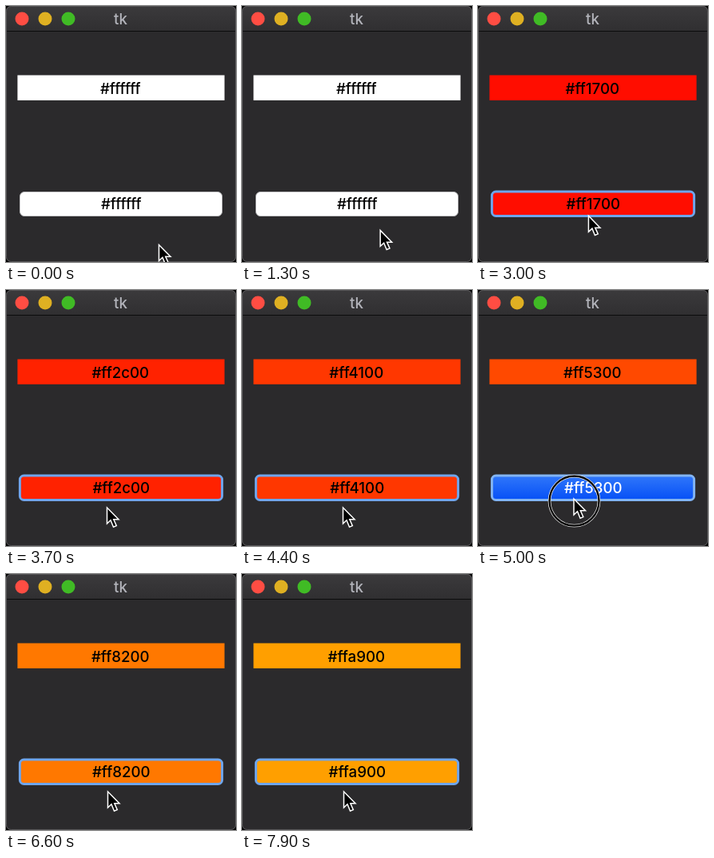
An HTML page that plays this animation: 288x320 px, repeating every 8 s.

```html
<!DOCTYPE html>
<html lang="en">
<head>
<meta charset="utf-8">
<title>tk</title>
<style>
  html, body { margin: 0; width: 100%; height: 100%; overflow: hidden; background: #000; }
  svg { display: block; }
  text { font: 500 18.7px Inter, Roboto, sans-serif; text-anchor: middle; }
</style>
</head>
<body>
<svg width="288" height="320" viewBox="0 0 288 320">
  <defs>
    <linearGradient id="bar" x2="0" y2="1">
      <stop stop-color="#3b3a3c"/><stop offset="1" stop-color="#302f31"/>
    </linearGradient>
    <linearGradient id="blue" x2="0" y2="1">
      <stop stop-color="#3077fa"/><stop offset="1" stop-color="#0650f6"/>
    </linearGradient>
    <clipPath id="window"><rect width="288" height="320" rx="6"/></clipPath>
  </defs>
  <g clip-path="url(#window)">
    <rect width="288" height="320" fill="#2b2a2c"/>
    <rect width="288" height="31" fill="url(#bar)"/>
    <rect y="31" width="288" height="1" fill="#0b0b0c"/>
  </g>
  <rect x=".5" y=".5" width="287" height="319" rx="6" fill="none" stroke="#555456"/>
  <circle cx="20" cy="16" r="8.5" fill="#ff4d43"/>
  <circle cx="49" cy="16" r="8.5" fill="#dfb022"/>
  <circle cx="78" cy="16" r="8.5" fill="#40bb25"/>
  <text x="143.5" y="23" fill="#b2b3ba">tk</text>

  <rect id="label" x="14.4" y="86.5" width="259.2" height="31.4"/>
  <text id="labelText" x="143.3" y="110">#ffffff</text>

  <rect id="button"/>
  <text id="buttonText" x="144.3" y="254">#ffffff</text>

  <g id="pointer">
    <g id="ring" fill="none">
      <circle cx=".5" cy="2.7" r="31" stroke="#ddd" stroke-width="3.8"/>
      <circle cx=".5" cy="2.7" r="31" stroke="#000" stroke-width="2.2"/>
    </g>
    <path d="M0 0V20L4.5 15.8L8 24.2L11.8 22.6L8.3 14.8H14.5Z" stroke="#fff" stroke-width="1.5"/>
  </g>
</svg>
<script>
const LOOP = 8000, STEP = 100;
const PRESSES = [[1900, 2200], [4700, 6100]];
// time, x, y of the pointer tip
const PATH = [
  [0, 191.5, 298.5], [900, 191.5, 298.5], [1800, 147.5, 255], [2500, 147.5, 255],
  [3600, 126.5, 272], [4500, 126.5, 272], [4800, 120, 261], [5100, 120, 261],
  [5600, 122.5, 256], [6100, 122.5, 256], [6500, 127.5, 272], [LOOP, 127.5, 272]
];
const $ = id => document.getElementById(id);
const set = (id, attrs) => {
  for (const key in attrs) $(id).setAttribute(key, attrs[key]);
};

function pointerAt(t) {
  const i = PATH.findIndex(p => p[0] > t);
  const [t0, x0, y0] = PATH[i - 1], [t1, x1, y1] = PATH[i];
  const u = (t - t0) / (t1 - t0), e = u * u * (3 - 2 * u);
  return [x0 + (x1 - x0) * e, y0 + (y1 - y0) * e];
}

// The screen shows the named colour slightly redder than its code.
function colorAt(t) {
  if (t < 2200) return { code: '#ffffff', fill: '#fff' };
  const green = Math.max(0, Math.floor(6 + (t - 2400) * 163 / 5500));
  return {
    code: '#ff' + green.toString(16).padStart(2, '0') + '00',
    fill: `rgb(255, ${Math.max(0, green - 10)}, 0)`
  };
}

function draw(now) {
  const t = Math.floor(now % LOOP / STEP) * STEP;
  const { code, fill } = colorAt(t);
  const pressed = PRESSES.some(([from, to]) => t >= from && t < to);
  const focused = t >= PRESSES[0][0];

  set('label', { fill });
  $('labelText').textContent = $('buttonText').textContent = code;
  set('button', focused
    ? { x: 17.4, y: 232, width: 253.2, height: 30.4, rx: 5, stroke: pressed ? '#82b4f2' : '#6ea5ec', 'stroke-width': 3 }
    : { x: 17.5, y: 232.5, width: 253, height: 30, rx: 5.5, stroke: '#c4c4c6', 'stroke-width': 1 });
  set('button', { fill: pressed ? 'url(#blue)' : fill });
  set('buttonText', { fill: pressed ? '#fff' : '#000' });
  set('pointer', { transform: `translate(${pointerAt(t)})` });
  set('ring', { visibility: pressed ? 'visible' : 'hidden' });
  requestAnimationFrame(() => draw(performance.now()));
}
draw(performance.now());
</script>
</body>
</html>
```
